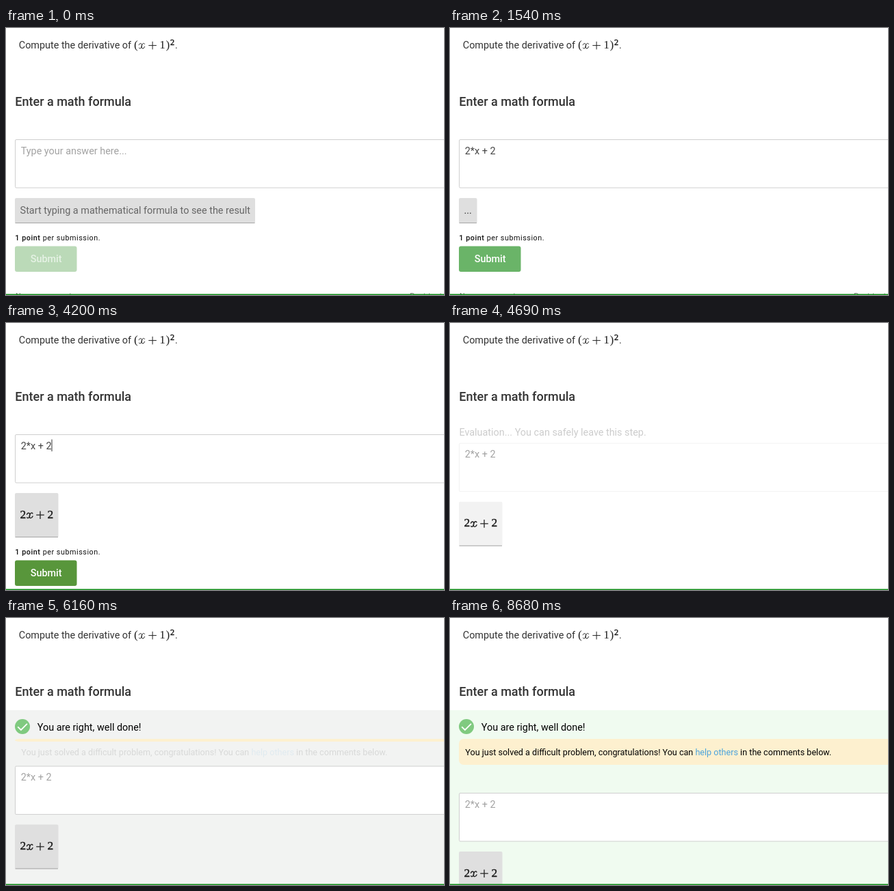
Animation, 640 px wide and 391 px high, one loop 8.75 s. Source, as an HTML page:

```html
<!DOCTYPE html>
<html lang="en">
<head>
<meta charset="utf-8">
<title>Math formula exercise</title>
<style>
  html, body { margin: 0; width: 100%; height: 100%; overflow: hidden; background: #fff; }
  svg { display: block; width: 640px; height: 391px; font: 14.4px Roboto, sans-serif; }
  .title { font-size: 18px; font-weight: 500; }
  .small { font-size: 10.8px; letter-spacing: .53px; }
  .note { font-size: 12.6px; }
  .strong { font-weight: 500; }
  .math { font: 17.4px "Liberation Serif", serif; }
  .power { font-size: 12.2px; }
  .bold { stroke: #111; stroke-width: .4px; }
</style>
</head>
<body>
<svg id="stage" viewBox="0 0 640 391"></svg>
<script>
const LOOP = 8750, STEP = 70;
const PASTE = 910, PARSED = 3150, CLICK = 4410, LEAVE = 4620, GREY = 5950, RESULT = 6160;
const stage = document.getElementById('stage');

const progress = (t, start, end) => Math.min(1, Math.max(0, (t - start) / (end - start)));
const ease = p => p * p * (3 - 2 * p);
const mix = (a, b, p) => `rgb(${a.map((v, i) => Math.round(v + (b[i] - v) * p))})`;

const rect = (x, y, w, h, fill, extra = '') =>
  `<rect x="${x}" y="${y}" width="${w}" height="${h}" fill="${fill}" ${extra}/>`;
const text = (x, y, content, fill = '#333', cls = '', extra = '') =>
  `<text x="${x}" y="${y}" fill="${fill}" class="${cls}" ${extra}>${content}</text>`;

// Italic x and wide plus in the style of a typeset formula
const mathX = (x, y, weight) => `<path transform="translate(${x} ${y})" fill="none" stroke="#222"
  stroke-width="${weight}" stroke-linecap="round" d="M.7-5.2C1.4-7.6 4.2-8.4 5-5.6L4.3-2C3.6.6 1.2.6 1-.9
  M9.1-6.6C8.6-8.2 6.2-7.9 5.3-5.4L4.6-2C4.6.8 8 .8 9.2-2.6"/>`;
const mathPlus = (x, y, weight) =>
  `<path d="M${x} ${y - 4.4}h11.6m-5.8-5.8v11.6" stroke="#222" stroke-width="${weight}" fill="none"/>`;
const math = (x, y, content, cls = '') => text(x, y, content, '#222', `math ${cls}`);

function question() {
  const y = 30;
  return text(18.8, y, 'Compute the derivative of') +
    math(187, y, '(') + mathX(193.5, y, 1) + mathPlus(208.3, y, 1) +
    math(224.3, y, '1') + math(233.4, y, ')') +
    math(240, y - 5.3, '2', 'power bold') + text(247, y, '.') +
    text(13.3, 114, 'Enter a math formula', '#333', 'title');
}

function feedback(t) {
  if (t < CLICK) return '';
  if (t < RESULT) {
    return (t < GREY ? '' : rect(0, 135, 640, 256, '#f2f2f2')) +
      text(13.4, 164.5, 'Evaluation... You can safely leave this step.', '#000', '',
        `opacity="${progress(t, LEAVE, 4970)}"`);
  }
  const p = ease(progress(t, RESULT - STEP, 6440));
  const link = '<tspan fill="#4ba3dc">help others</tspan>';
  return rect(0, 135, 640, 256, mix([242, 242, 242], [240, 251, 240], p)) +
    '<circle cx="24" cy="159" r="11" fill="#80ca80"/>' +
    '<path d="M17.2 159.3l4.7 4.7 9-9.2" fill="none" stroke="#fff" stroke-width="1.8"/>' +
    text(45.8, 164.5, 'You are right, well done!', '#000') +
    rect(13, 177, 650, 38 * p, '#fdf0cf', 'rx="7"') +
    text(22.3, 200.5, `You just solved a difficult problem, congratulations! You can ${link} in the comments below.`,
      '#000', 'note', `opacity="${p}"`);
}

function caretVisible(t) {
  if (t < PASTE || t >= CLICK) return false;
  const toggles = [1540, 2030, 2590, 3080, 3640, 4200];
  return toggles.filter(time => time <= t).length % 2 === 0;
}

function answer(t, shift, waiting) {
  const empty = t < PASTE;
  const color = empty || t >= CLICK ? '#a2a2a2' : '#444';
  return rect(13.5, 163.5 + shift, 650, 70.5, '#fff',
      `rx="1.5" stroke="${waiting ? '#f2f2f2' : '#cfcfcf'}"`) +
    text(21.7, 184.5 + shift, empty ? 'Type your answer here...' : '2*x + 2', color) +
    (caretVisible(t) ? rect(66.5, 170.5, 1, 17.5, '#333') : '');
}

function preview(t, shift, waiting) {
  const y = 249 + shift;
  const box = (w, h) => rect(13, y, w, h, waiting ? '#f2f2f2' : '#dfdfdf', 'rx="2"') +
    rect(13.5, y + h - 1, w - 1, 1, '#a5a5a5');
  if (t < PASTE) {
    return box(351, 37) +
      text(20.6, y + 23, 'Start typing a mathematical formula to see the result', '#666');
  }
  if (t < PARSED) {
    return `<g opacity="${t < PARSED - STEP ? 1 : .25}">` +
      box(26.5, 37) + text(20.5, y + 23, '...', '#333') + '</g>';
  }
  const base = y + 36.6;
  return box(63.5, 65) + math(20.6, base, '2', 'bold') + mathX(29.8, base, 1.4) +
    mathPlus(44.2, base, 1.3) + math(60.6, base, '2', 'bold');
}

function submitColor(t) {
  const disabled = [187, 218, 184], enabled = [106, 180, 104], hover = [88, 150, 59];
  if (t < 3920) return mix(disabled, enabled, progress(t, 980, 1260));
  if (t < CLICK) return mix(enabled, hover, progress(t, 3850, 3990));
  return mix(hover, disabled, progress(t, CLICK - STEP, LEAVE));
}

function footer(t) {
  if (t >= LEAVE) return '';
  const y = t < PARSED ? 0 : 28;
  return text(13.3, 310.5 + y, '<tspan class="strong">1 point</tspan> per submission.', '#111', 'small') +
    rect(13, 319.5 + y, 90.5, 37.5, submitColor(t), 'rx="3"') +
    text(35.7, 343 + y, 'Submit', t < PASTE ? '#e6f2e5' : '#fff', 'strong') +
    text(14, 395.5 + y, 'No answer sent', '#777', 'small') +
    text(590, 395.5 + y, 'Past tests', '#777', 'small');
}

function draw(t) {
  const shift = 49 * ease(progress(t, 4550, 4970)) + 44 * ease(progress(t, RESULT - STEP, 6440));
  const waiting = t >= LEAVE && t < RESULT;
  return rect(0, 0, 640, 391, '#fff') + question() + feedback(t) +
    answer(t, shift, waiting) + preview(t, shift, waiting) + footer(t) +
    rect(0, 389.5, 640, 1.5, '#14901c');
}

let shown = -1;
function tick(now) {
  const t = Math.floor(now % LOOP / STEP) * STEP;
  if (t !== shown) stage.innerHTML = draw(shown = t);
  requestAnimationFrame(tick);
}
tick(performance.now());
</script>
</body>
</html>
```
